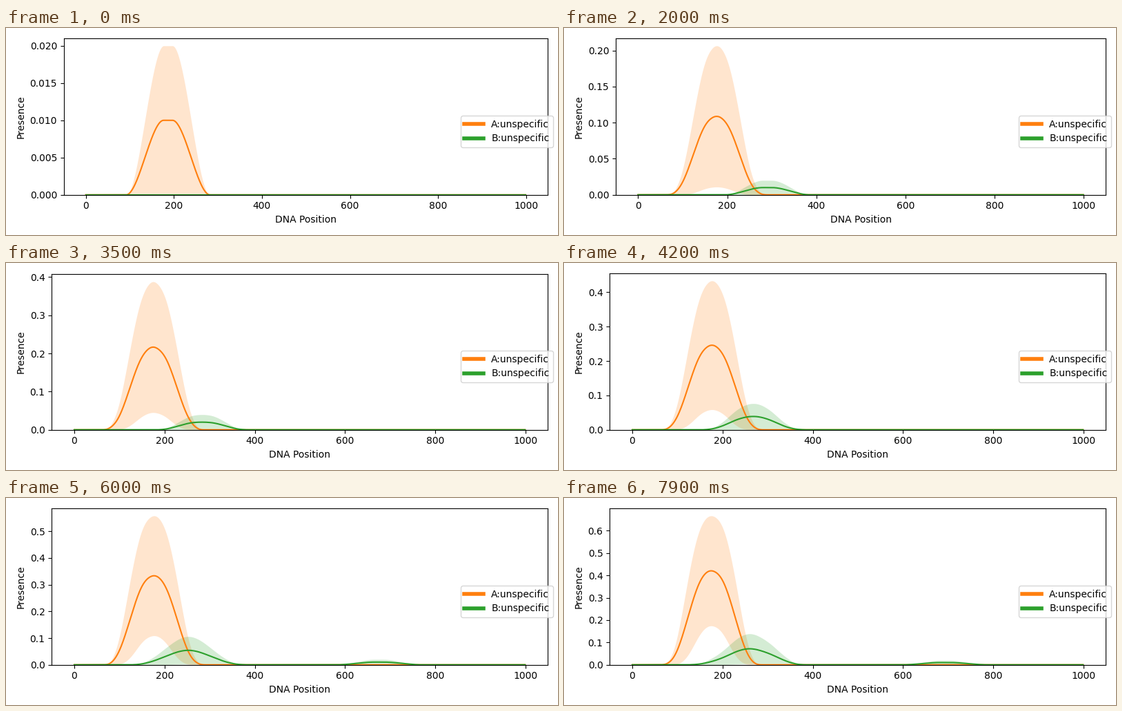
Animation, 800 px wide and 300 px high, one loop 8 s. Source, as a matplotlib script:

```python
import matplotlib.pyplot as plt
import numpy as np
from matplotlib.animation import FuncAnimation
from matplotlib.lines import Line2D

FRAMES, INTERVAL = 80, 100
SAMPLES = 100
CORE, REACH = 10, 95  # half widths of a footprint's flat top and of its base
GOLDEN = 0.618034
COLORS = {"A": "C1", "B": "C2"}
x = np.arange(1000)


def footprint(center):
    t = np.clip((REACH - np.abs(x - center)) / (REACH - CORE), 0, 1)
    return t * t * (3 - 2 * t)


def wobble(i, k):
    return 1.5 * np.sin(1.1 * i + 2.4 * k)


def presence_a(i):
    """Proteins gather around one site; their peak spreads slowly."""
    count = int(np.interp(i, [0, 20, 35, 60, 79], [1, 11, 22, 34, 43]))
    spots = (0.77 + GOLDEN * np.arange(count)) % 1
    total = sum(footprint(156 + 40 * s + wobble(i, k))
                for k, s in enumerate(spots))
    overlap = 1 - 0.0225 * (i / (FRAMES - 1)) ** 0.47
    return count / SAMPLES * overlap * total / total.max()


def presence_b(i):
    """Proteins line up beside A, and one binds far away and drifts."""
    count = int(np.interp(i, [0, 6, 35, 48, 60, 79], [0, 1, 2, 6, 6, 8]))
    total = np.zeros(len(x))
    for k in range(count):
        total += footprint(290 - 15 * (k % 6) + wobble(i, k))
    if i >= 54:
        total += footprint(615 + i + wobble(i, 0))
    return total / SAMPLES


fig, ax = plt.subplots(figsize=(8, 3), dpi=100)
ax.set_xlabel("DNA Position")
ax.set_ylabel("Presence")
ax.set_xlim(-49.95, 1048.95)
lines = {name: ax.plot(x, 0 * x, color=c)[0] for name, c in COLORS.items()}
bands = []
fig.legend(
    [Line2D([], [], color=c, lw=4) for c in COLORS.values()],
    [f"{name}:unspecific" for name in COLORS],
    loc="center right",
)


def update(i):
    while bands:
        bands.pop().remove()
    top = 0
    for name, p in (("A", presence_a(i)), ("B", presence_b(i))):
        var = p * (1 - p) * SAMPLES / (SAMPLES - 1)
        lines[name].set_ydata(p)
        bands.append(ax.fill_between(x, p - var, p + var,
                                     color=COLORS[name], alpha=0.2, lw=0))
        top = max(top, (p + var).max())
    ax.set_ylim(0, 1.05 * top)
    fig.tight_layout()
    return [*lines.values(), *bands]


anim = FuncAnimation(fig, update, frames=FRAMES, interval=INTERVAL,
                     init_func=lambda: update(0), repeat=True, repeat_delay=0)
plt.show()
```
